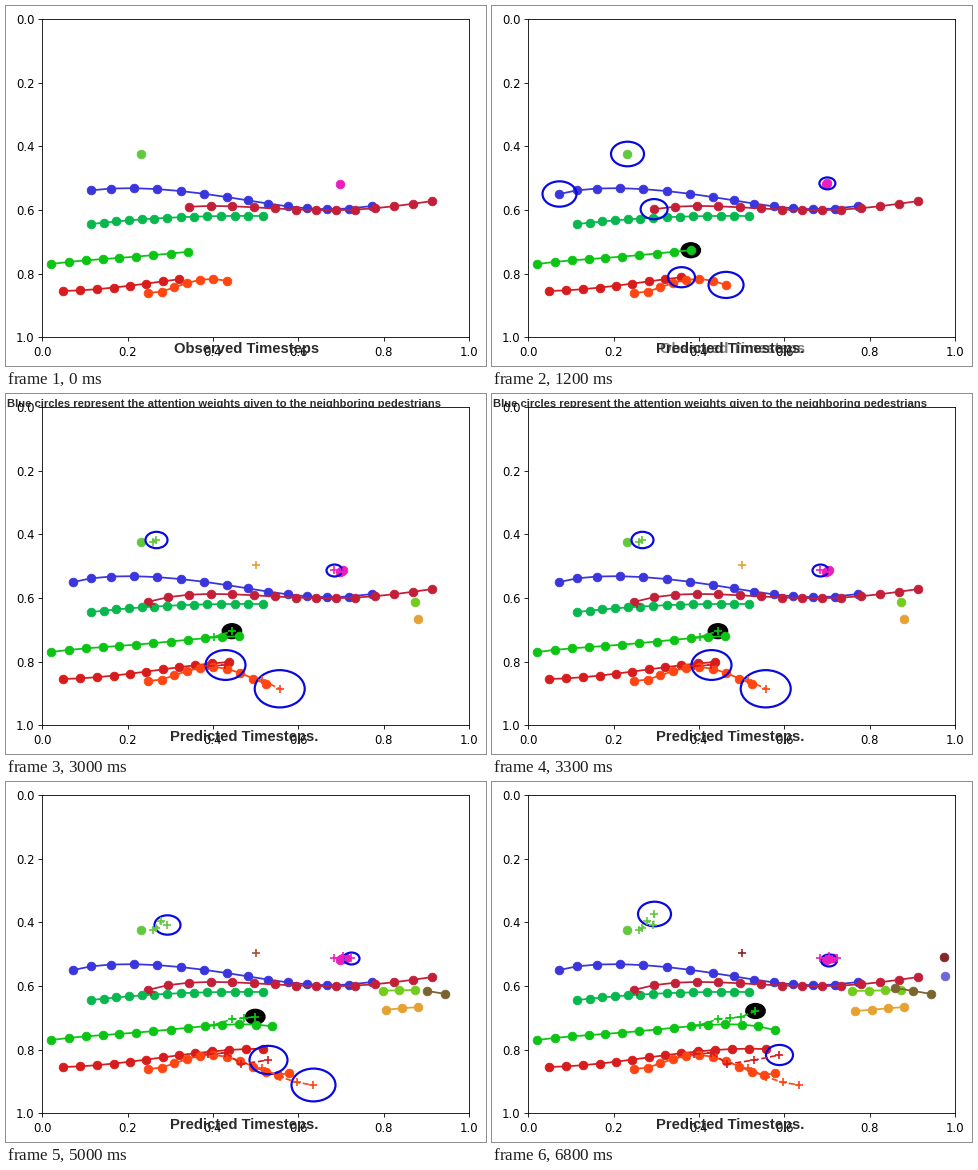
Recreate the animation shown at these times as a matplotlib script. Size 480 by 360 pixels, loop 7000 ms.

```python
import numpy as np
import matplotlib.pyplot as plt
from matplotlib.animation import FuncAnimation
from matplotlib.colors import to_rgb
from matplotlib.patches import Ellipse

W, H, DPI = 480, 360, 75
LEFT, RIGHT, TOP, BOTTOM = 36.3, 463, 13.2, 331.4
ASPECT = (BOTTOM - TOP) / (RIGHT - LEFT)
INK = "#2b2b2b"
RING = "#0808e0"
STEPS = 7


def curve(count, *keys):
    """Evenly timed points on the polynomial through evenly timed key points."""
    t = np.linspace(0, 1, len(keys))
    coefficients = np.polyfit(t, np.array(keys, float), len(keys) - 1)
    at = np.linspace(0, 1, count)
    return np.column_stack([np.polyval(c, at) for c in coefficients.T])


def orbit(count, x, y, rx, ry):
    """Quarter turns around a walker that stays in place."""
    angle = np.pi / 2 * (1 + np.arange(count))
    return np.column_stack([x + rx * np.cos(angle), y + ry * np.sin(angle)])


class Walker:
    """`seen` points show at step 0; one more is added from step `start` on."""

    def __init__(self, color, path, seen=0, start=1, forecast=(), rings=(),
                 focus=False):
        self.color, self.route = color, path
        self.seen, self.start = seen, start
        self.forecast, self.rings, self.focus = forecast, rings, focus

    def path(self, step):
        return self.route[:self.seen + max(0, step - self.start + 1)]

    def predicted(self, step):
        return self.forecast[:max(0, step - 1)]

    def ring(self, step):
        """Centre and radius of the attention circle, if there is one."""
        if not 1 <= step <= len(self.rings):
            return None
        ahead = self.predicted(step)
        center = ahead[-1] if len(ahead) else self.path(step)[-1]
        return center, self.rings[step - 1]


walkers = [
    Walker("#3a35dc", curve(15, (366, 200), (291, 201.5), (220, 191),
                            (139, 182.5), (67, 188)), 14, rings=[17]),
    Walker("#c41f38", curve(15, (426, 195), (358.5, 203), (289, 203.5),
                            (215, 200), (141, 208)), 13,
           forecast=[(145, 210)], rings=[13.5, 13.5]),
    Walker("#06b84e", curve(14, (85, 218), (167.5, 211.5), (256, 210)), 14),
    Walker("#0cc414", curve(15, (45, 258), (104.5, 252.5), (164, 247.5),
                            (224, 242.5), (282, 248)), 9,
           forecast=curve(5, (207, 243), (230, 236.5), (245, 235.5), (263, 229)),
           rings=[8.8] * 6, focus=True),
    Walker("#d61c1c", curve(14, (57, 285), (129, 279), (200, 270),
                            (274, 267)), 8,
           forecast=[(202, 272), (219, 271), (235, 282), (262, 278), (287, 273)],
           rings=[13.5, 18.5, 20, 13, 19, 13.5]),
    Walker("#ff4512", curve(12, (142, 287), (177.5, 278), (213.5, 273.5),
                            (250, 286), (282, 291)), 7,
           forecast=curve(4, (255, 286), (282, 298), (307, 303)),
           rings=[17.5, 30, 25, 26, 22]),
    Walker("#62c83e", curve(1, (135, 148)), 1,
           forecast=[(147, 148), (150, 146), (155, 139), (161, 143), (162, 132)],
           rings=[16.5, 7.5, 11, 18, 13, 16.5]),
    Walker("#ea20bd", curve(7, (334, 178), (337, 176.5), (341, 176)), 1,
           forecast=orbit(5, 336.5, 176.5, 8.5, 2), rings=[8] * 6),
    Walker("#e5a233", curve(4, (412, 225), (363, 229)), start=3),
    Walker("#74cc1c", curve(4, (409, 208), (360, 209)), start=3),
    Walker("#7a6430", curve(3, (439, 212), (403, 206)), start=4),
    Walker("#86262c", curve(1, (452, 175)), start=6),
    Walker("#6e66da", curve(1, (453, 194)), start=6),
]

NOTES = {
    2: "Black circle indicates the pedestrian of interest.",
    3: "Blue circles represent the attention weights given to the "
       "neighboring pedestrians",
}

fig = plt.figure(figsize=(W / DPI, H / DPI), dpi=DPI, facecolor="white")
ax = fig.add_axes([LEFT / W, 1 - BOTTOM / H,
                   (RIGHT - LEFT) / W, (BOTTOM - TOP) / H])
# Path coordinates are stage pixels; x is measured at pixel centres.
x_range = LEFT - 0.5, RIGHT - 0.5
ax.set(xlim=x_range, ylim=(BOTTOM, TOP), autoscale_on=False)
labels = [f"{v:.1f}" for v in np.linspace(0, 1, 6)]
ax.set_xticks(np.linspace(*x_range, 6), labels)
ax.set_yticks(np.linspace(TOP, BOTTOM, 6), labels)
ax.tick_params(labelsize=11.2, length=4)
ax.tick_params(axis="x", pad=4.5)


def label(x, y, size, **kwargs):
    return fig.text(x / W, 1 - y / H, "", fontsize=size * 72 / DPI,
                    family="Liberation Sans", weight="bold", color=INK, **kwargs)


note = label(1, 12.7, 11.2, zorder=-1)
observed = label(168, 347, 14.7)
predicted = label(164, 347, 14.7)
drawn = []


def trail(points, color, z, **style):
    if len(points):
        drawn.extend(ax.plot(*np.transpose(points), color=color, zorder=z,
                             **style))


def crosses(points, color):
    trail(points, color, 5, ls="--", lw=1.6, marker="+", ms=7, mew=1.6)


def draw_ring(center, radius, focus):
    look = (dict(fc="black", ec="black", lw=3, zorder=2) if focus
            else dict(fill=False, ec=RING, lw=2.1, zorder=4))
    drawn.append(ax.add_patch(
        Ellipse(center, 2 * radius, 2 * radius * ASPECT, **look)))


def draw(step):
    while drawn:
        drawn.pop().remove()
    for walker in walkers:
        trail(walker.path(step), walker.color, 3, lw=1.7, marker="o", ms=8.3,
              mew=0.8)
        crosses(walker.predicted(step), walker.color)
        ring = walker.ring(step)
        if ring:
            draw_ring(*ring, walker.focus)
    if step >= 3:
        # A lone forecast darkens from tan to deep red.
        mix = (step - 3) / 3
        tan, red = np.array(to_rgb("#e5a233")), np.array(to_rgb("#8c2424"))
        crosses([(250, 171.5)], tuple((1 - mix) * tan + mix * red))
    note.set_text(NOTES.get(step, ""))
    # Both captions overlap while one replaces the other.
    observed.set_text("Observed Timesteps" if step < 2 else "")
    observed.set_alpha(1 if step == 0 else 0.6)
    predicted.set_text("Predicted Timesteps." if step else "")
    return drawn


anim = FuncAnimation(fig, draw, frames=STEPS, init_func=lambda: draw(0),
                     interval=1000, repeat=True, repeat_delay=0, blit=False)
plt.show()
```
